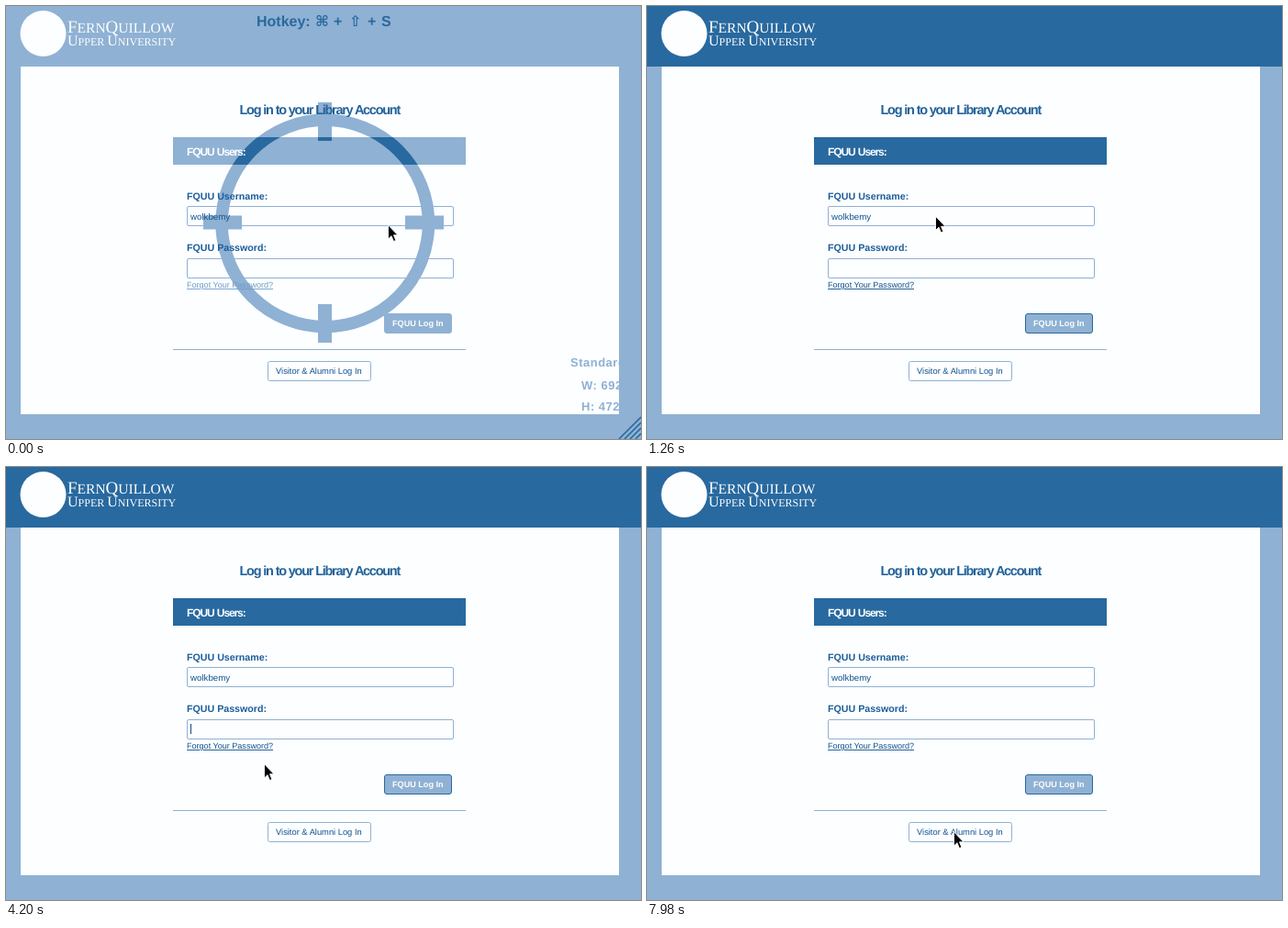
An HTML page for the animation above (8 s loop, 692 px wide and 472 px high).

```html
<!DOCTYPE html>
<html lang="en">
<head>
<meta charset="utf-8">
<title>Library login</title>
<style>
  html, body { margin: 0; width: 100%; height: 100%; overflow: hidden; }
  svg { display: block; width: 100vw; height: 100vh; --dark: #28699f; --light: #8fb1d3; --paper: #fdfeff; --bar: var(--dark); --link: #10528f; }
  svg.opening { --bar: var(--light); --link: #6f9cc8; }
  text { font-family: "Liberation Sans", Arial, sans-serif; fill: #10528f; text-rendering: geometricPrecision; white-space: pre; }
  .logo { font-family: "Liberation Serif", Times, serif; fill: var(--paper); }
  .title { font-size: 14.5px; font-weight: bold; letter-spacing: -1.28px; word-spacing: .3px; fill: #22629a; }
  .heading { font-size: 12px; font-weight: bold; letter-spacing: -1.1px; word-spacing: 1px; fill: var(--paper); }
  .label { font-size: 10.67px; font-weight: bold; fill: #1b5d9a; }
  .value { font-size: 9.7px; }
  .link { font-size: 9.05px; text-decoration: underline; fill: var(--link); }
  .primary text { font-size: 9.1px; font-weight: bold; fill: var(--paper); }
  .primary rect { fill: var(--light); stroke: var(--bar); }
  .secondary text { font-size: 9.33px; }
  .secondary rect { fill: var(--paper); stroke: var(--light); }
  .field { fill: none; stroke: var(--light); }
  .hotkey { font-size: 16px; font-weight: bold; font-family: "Liberation Sans", "DejaVu Sans", sans-serif; fill: var(--dark); }
  .size { font-size: 13px; font-weight: bold; letter-spacing: .5px; fill: var(--light); }
  .caret { fill: #164a7c; }
</style>
</head>
<body>
<svg id="stage" viewBox="0 0 692 472">
  <defs>
    <g id="scope" fill="none">
      <circle cx="347.8" cy="237" r="112.7" stroke-width="13.5"/>
      <path d="M347.5 105v42M347.5 325v42M215 236h42M435 236h42" stroke-width="15"/>
    </g>
    <clipPath id="barArea"><rect x="182" y="143" width="319" height="30"/></clipPath>
  </defs>

  <rect width="692" height="472" fill="var(--light)"/>
  <rect width="692" height="66" fill="var(--bar)"/>
  <rect x="16" y="66" width="652" height="379" fill="var(--paper)"/>
  <circle cx="40.5" cy="30" r="25" fill="var(--paper)"/>
  <text class="logo" x="67" y="29" font-size="15.5"><tspan font-size="19">F</tspan>ERN<tspan font-size="19">Q</tspan>UILLOW</text>
  <text class="logo" x="67" y="43" font-size="12"><tspan font-size="16">U</tspan>PPER <tspan font-size="16">U</tspan>NIVERSITY</text>

  <g id="hud">
    <use href="#scope" stroke="var(--light)"/>
    <text class="hotkey" y="22"><tspan x="273">Hotkey:</tspan><tspan x="337">⌘</tspan><tspan x="357">+</tspan><tspan x="374">⇧</tspan><tspan x="394">+</tspan><tspan x="409">S</tspan></text>
    <text class="size" x="615" y="393">Standard</text>
    <text class="size" x="627" y="418">W: 692</text>
    <text class="size" x="627" y="441">H: 472</text>
    <path d="M668 472l24 -24M674 472l18 -18M680 472l12 -12M686 472l6 -6" stroke="var(--dark)" stroke-width="1.6"/>
  </g>

  <text class="title" x="254.500" y="117.500">Log in to your Library Account</text>
  <rect class="field" x="197.500" y="218.500" width="290" height="21" rx="1.500"/>
  <rect class="field" x="197.500" y="275.500" width="290" height="21" rx="1.500"/>
  <text class="value" x="201" y="233">wolkbemy</text>
  <path d="M182 374.500h319" stroke="var(--light)"/>

  <g id="member">
    <rect x="182" y="143" width="319" height="30" fill="var(--bar)"/>
    <use id="scopeOnBar" href="#scope" stroke="var(--dark)" clip-path="url(#barArea)"/>
    <text class="heading" x="197" y="162.500">FQUU Users:</text>
    <text class="label" x="197" y="211">FQUU Username:</text>
    <text class="label" x="197" y="267">FQUU Password:</text>
    <text class="link" x="197" y="307">Forgot Your Password?</text>
    <g class="primary">
      <rect x="412.500" y="335.500" width="73" height="21" rx="2.500"/>
      <text x="421" y="349">FQUU Log In</text>
    </g>
    <g class="secondary">
      <rect x="285.500" y="387.500" width="112" height="21" rx="2"/>
      <text x="294" y="401">Visitor &amp; Alumni Log In</text>
    </g>
  </g>

  <g id="visitor">
    <text class="heading" x="197" y="162.500" style="fill:#23517f">Visitor &amp; Alumni:</text>
    <text class="label" x="197" y="211">Your Last Name:</text>
    <text class="label" x="197" y="267">Your Library Barcode:</text>
    <text class="link" x="197" y="307">Where do I find my barcode?</text>
    <g class="primary">
      <rect x="368.500" y="335.500" width="117" height="21" rx="2.500"/>
      <text x="377" y="349">Visitor &amp; Alumni Log In</text>
    </g>
    <g class="secondary">
      <rect x="294.500" y="387.500" width="94" height="21" rx="2"/>
      <text x="303" y="401">FQUU User Log In</text>
    </g>
  </g>

  <rect id="nameCaret" class="caret" x="244" y="224" width="1" height="11"/>
  <rect id="passwordCaret" class="caret" x="201" y="280" width="1" height="11"/>
  <path id="cursor" d="M.5 .3V15.500L4 12.200L6.400 18L8.900 17L6.500 11.300H11Z" fill="#000" stroke="#fff" stroke-width=".9"/>
</svg>
<script>
  const LOOP = 8000, TICK = 70;
  const $ = id => document.getElementById(id);

  // Pointer path: time, x, y of the tip
  const path = [
    [0, 416, 238.5], [280, 416, 238.5], [560, 314, 229], [1260, 314, 229],
    [1470, 297, 229], [1540, 297, 229], [1610, 297, 230], [3010, 297, 230],
    [3080, 292, 237.5], [3360, 272, 282], [3640, 272, 282], [3780, 271, 285],
    [4130, 271, 285], [4200, 281, 323.5], [4340, 331, 391], [6090, 331, 391],
    [6230, 334, 397.5], [LOOP, 334, 397.5]
  ];

  const within = (t, ...spans) => spans.some(([from, to]) => t >= from && t < to);
  const show = (id, on) => { $(id).style.display = on ? "" : "none"; };

  function pointerAt(t) {
    const i = path.findIndex(point => point[0] > t);
    const [t0, x0, y0] = path[i - 1], [t1, x1, y1] = path[i];
    const k = (t - t0) / (t1 - t0);
    return [x0 + (x1 - x0) * k, y0 + (y1 - y0) * k];
  }

  function render(t) {
    const opening = t < TICK;
    const visitor = within(t, [5110, 7980]);
    $("stage").classList.toggle("opening", opening);
    show("hud", opening);
    show("scopeOnBar", opening);
    show("member", !visitor);
    show("visitor", visitor);
    show("nameCaret", within(t, [1470, 2170], [2660, 3360]));
    show("passwordCaret", within(t, [3570, 4270], [4830, 5110]));
    // The pointer advances in whole ticks
    const [x, y] = pointerAt(Math.floor(t / TICK) * TICK);
    $("cursor").setAttribute("transform", `translate(${x} ${y})`);
  }

  const start = performance.now();
  function loop() {
    render((performance.now() - start) % LOOP);
    requestAnimationFrame(loop);
  }
  loop();
</script>
</body>
</html>
```
